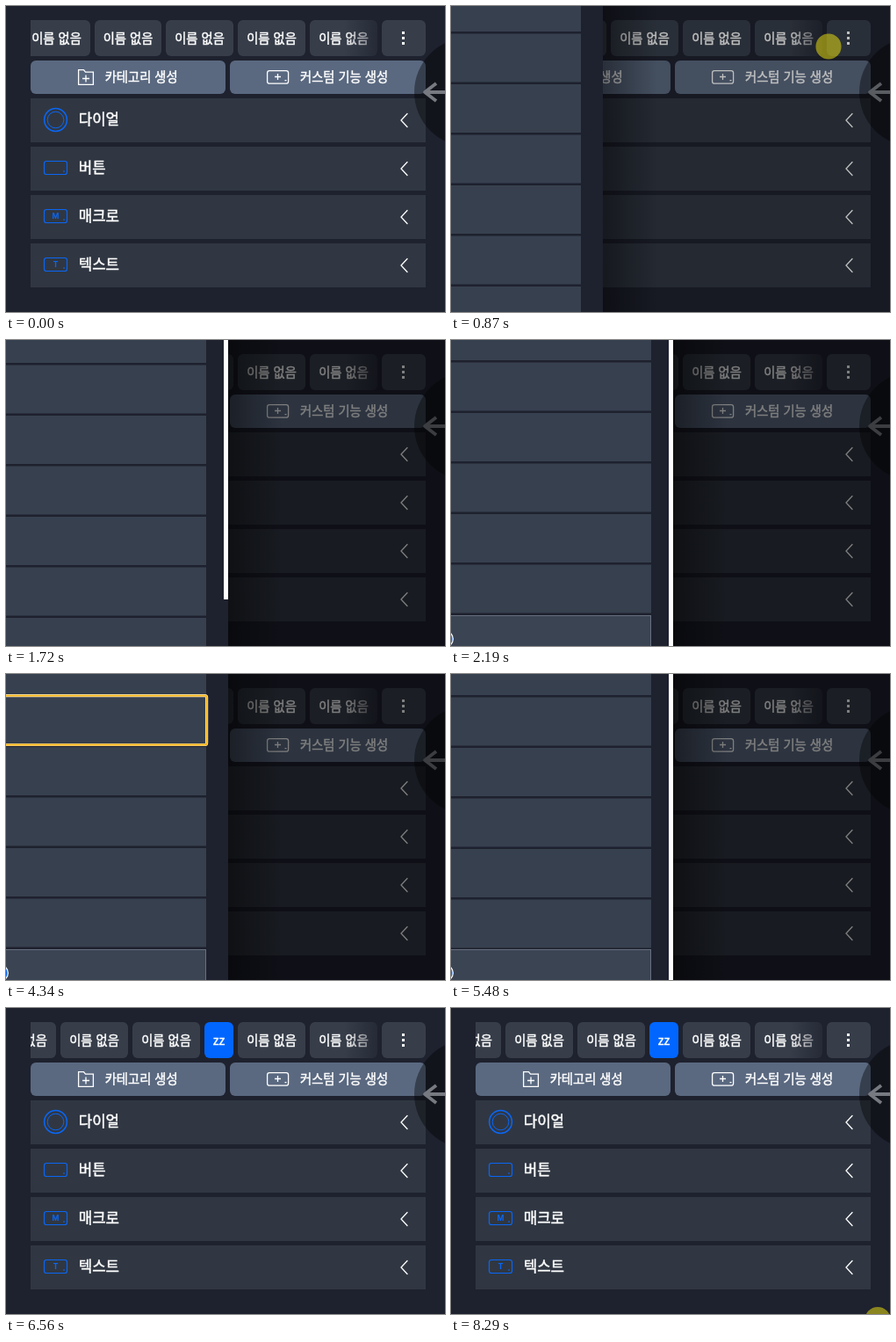
An HTML page that plays this animation: 500x348 px, repeating every 8360 ms.

```html
<!DOCTYPE html>
<html lang="ko">
<head>
<meta charset="utf-8">
<style>
html, body { margin: 0; width: 100%; height: 100%; overflow: hidden; background: #1e212e; }
svg { display: block; width: 100%; height: 100%; }
text { font-family: "Noto Sans CJK KR", "Noto Sans CJK", sans-serif; font-size: 14.3px; fill: #fff; stroke: #fff; stroke-width: .45px; }
.label { font-size: 16.8px; }
.mid { text-anchor: middle; }
.glyph { font: 700 9px Roboto, sans-serif; fill: #0a66f5; stroke: none; }
.blue { fill: none; stroke: #0a66f5; stroke-width: 1.2; }
.white { fill: none; stroke: #fff; stroke-width: 1.3; }
</style>
</head>
<body>
<svg viewBox="0 0 500 348">
  <defs>
    <clipPath id="tabClip"><path d="M28 0H500V60H28z"/></clipPath>
    <linearGradient id="tabFade"><stop stop-color="#1e212e" stop-opacity="0"/><stop offset="1" stop-color="#1e212e" stop-opacity=".7"/></linearGradient>
    <linearGradient id="shade"><stop stop-opacity=".4"/><stop offset="1" stop-opacity="0"/></linearGradient>
  </defs>
  <rect width="500" height="348" fill="#1e212e"/>

  <g clip-path="url(#tabClip)">
    <g id="tabsBefore"></g>
    <g id="tabsAfter"></g>
    <g id="tabsFixed"></g>
  </g>
  <rect x="385" y="16" width="39" height="41" fill="url(#tabFade)"/>
  <rect x="428" y="16" width="50" height="41" rx="6" fill="#373e4a"/>
  <path d="M451 29h3v3h-3zM451 35h3v3h-3zM451 41h3v3h-3z" fill="#fff"/>

  <g fill="#5a6980">
    <rect x="28" y="62" width="222" height="38" rx="6"/>
    <rect x="255" y="62" width="223" height="38" rx="6"/>
  </g>
  <path class="white" d="M82.6 89.4V72.6H88.5L90.5 75.2H99.4V89.4zM91 78.5v8M87 82.5h8"/>
  <text x="112.7" y="85.5">카테고리 생성</text>
  <rect class="white" x="297.6" y="73.6" width="24" height="14.6" rx="2.5"/>
  <path class="white" d="M309.5 77v7M306 80.5h7M317.5 84.7h2"/>
  <text x="335" y="85.5">커스텀 기능 생성</text>

  <g id="rows"></g>
  <g class="blue">
    <circle cx="56.5" cy="129.5" r="12.9" stroke-width="1.5"/>
    <circle cx="56.5" cy="129.5" r="9.3" stroke-width="1"/>
  </g>
  <text class="glyph mid" x="56.5" y="242.2">M</text>
  <text class="glyph mid" x="56.5" y="297.2">T</text>

  <circle cx="527" cy="98" r="62" fill="#000" fill-opacity=".4"/>
  <path d="M500 98H477M490 88L477 98L490 108" fill="none" stroke="#777a80" stroke-width="3.8" stroke-linejoin="round"/>

  <rect id="dim" width="500" height="348"/>
  <g id="drawer">
    <rect x="253" width="62" height="348" fill="url(#shade)"/>
    <rect x="-10" width="263" height="348" fill="#1e212e"/>
    <g id="list" fill="#37404e"></g>
    <g id="addRow">
      <rect x="-5" y="313.5" width="232.5" height="55" fill="#3b4452" stroke="#667080"/>
      <circle cx="-7" cy="340" r="9.3" fill="#0a66f5" stroke="#fff" stroke-width="1.3"/>
    </g>
    <g id="focus" fill="none">
      <rect x="-5" y="24.6" width="233.6" height="55.9" rx="2" stroke="#fff0c8" stroke-width="3.2"/>
      <rect x="-5" y="24.6" width="233.6" height="55.9" rx="2" stroke="#f2ae14" stroke-width="1.9"/>
    </g>
    <rect id="thumb" x="248" y="-600" width="5" height="600" fill="#fff"/>
  </g>
  <circle id="pointer" r="14.6" fill="#f6ea0e" fill-opacity=".5"/>
</svg>
<script>
const LOOP = 8360, PITCH = 57.5;
const $ = id => document.getElementById(id);

const tab = (x, w, label = '이름 없음', fill = '#373e4a') =>
  `<rect x="${x}" y="16" width="${w}" height="41" rx="6" fill="${fill}"/>
   <text class="mid" x="${x + w / 2}" y="41.5">${label}</text>`;
$('tabsBefore').innerHTML = tab(19, 77) + tab(101, 76) + tab(182, 77);
$('tabsAfter').innerHTML = tab(-20, 77) + tab(62, 77) + tab(144, 77) + tab(226, 33, 'zz', '#0066ff');
$('tabsFixed').innerHTML = tab(264, 77) + tab(346, 77);

$('rows').innerHTML = ['다이얼', '버튼', '매크로', '텍스트'].map((label, i) => {
  const y = 105 + i * 55;
  const key = i ? `<rect class="blue" x="43.5" y="${y + 16.5}" width="26" height="15" rx="2.5"/>
    <path class="blue" d="M65 ${y + 28}h2"/>` : '';
  return `<rect x="28" y="${y}" width="450" height="50" fill="#303742"/>${key}
    <text class="label" x="82.7" y="${y + 29.5}">${label}</text>
    <path class="white" stroke-linecap="round" d="M457 ${y + 17.5}L450 ${y + 25}L457 ${y + 32.5}"/>`;
}).join('');

$('list').innerHTML = Array.from({ length: 8 }, (_, i) =>
  `<rect x="-10" y="${(i - 1) * PITCH + 2.5}" width="238" height="55"/>`).join('');

// Progress in n equal jumps: the first at start, the last at end.
const steps = (t, start, end, n) => {
  const k = Math.floor((t + 4 - start) / ((end - start) / (n - 1))) + 1;
  return Math.min(n, Math.max(0, k)) / n;
};

// time, x, y; an entry without a position hides the pointer
const track = [
  [0], [130, 506, 72], [200, 490, 52], [270, 470, 34], [330, 458, 25], [400, 454, 23],
  [470, 452, 27], [540, 452, 33], [600, 452, 36], [870, 430, 46], [940, 360, 85],
  [1000, 220, 180], [1066, 60, 280], [1126],
  [7410, 389, 346], [7477, 424, 332], [7545, 459, 306], [7612, 488, 274], [7680],
  [8290, 486, 354.6]
];

function render(t) {
  const open = steps(t, 740, 1070, 6) - steps(t, 6270, 6560, 5);
  const down = steps(t, 1650, 1860, 4);
  const again = steps(t, 5070, 5480, 6);
  const scroll = 466 * down + 56.5 * again;
  const offset = ((29 - scroll) % PITCH + PITCH) % PITCH;
  const slide = 1 - (1 - open) ** 2;
  const shown = (id, on) => $(id).setAttribute('visibility', on ? 'visible' : 'hidden');
  const move = (id, x, y) => $(id).setAttribute('transform', `translate(${x} ${y})`);

  $('dim').setAttribute('opacity', 0.5 * open);
  move('drawer', -320 * (1 - slide), 0);
  move('list', 0, offset);
  move('thumb', 0, 145 + 300 * down);
  const fade = steps(t, 1130, 1330, 4) ** 1.4 - steps(t, 4130, 4340, 4) + again;
  $('thumb').setAttribute('opacity', fade);

  shown('addRow', t >= 2190);
  shown('focus', t >= 3590 && t < 5070);
  shown('tabsBefore', t < 6265);
  shown('tabsAfter', t >= 6265);

  const [, x, y] = track.findLast(point => point[0] <= t);
  shown('pointer', x !== undefined);
  if (x !== undefined) move('pointer', x, y);
}

const begin = performance.now();
function tick() {
  render((performance.now() - begin) % LOOP);
  requestAnimationFrame(tick);
}
tick();
</script>
</body>
</html>
```
